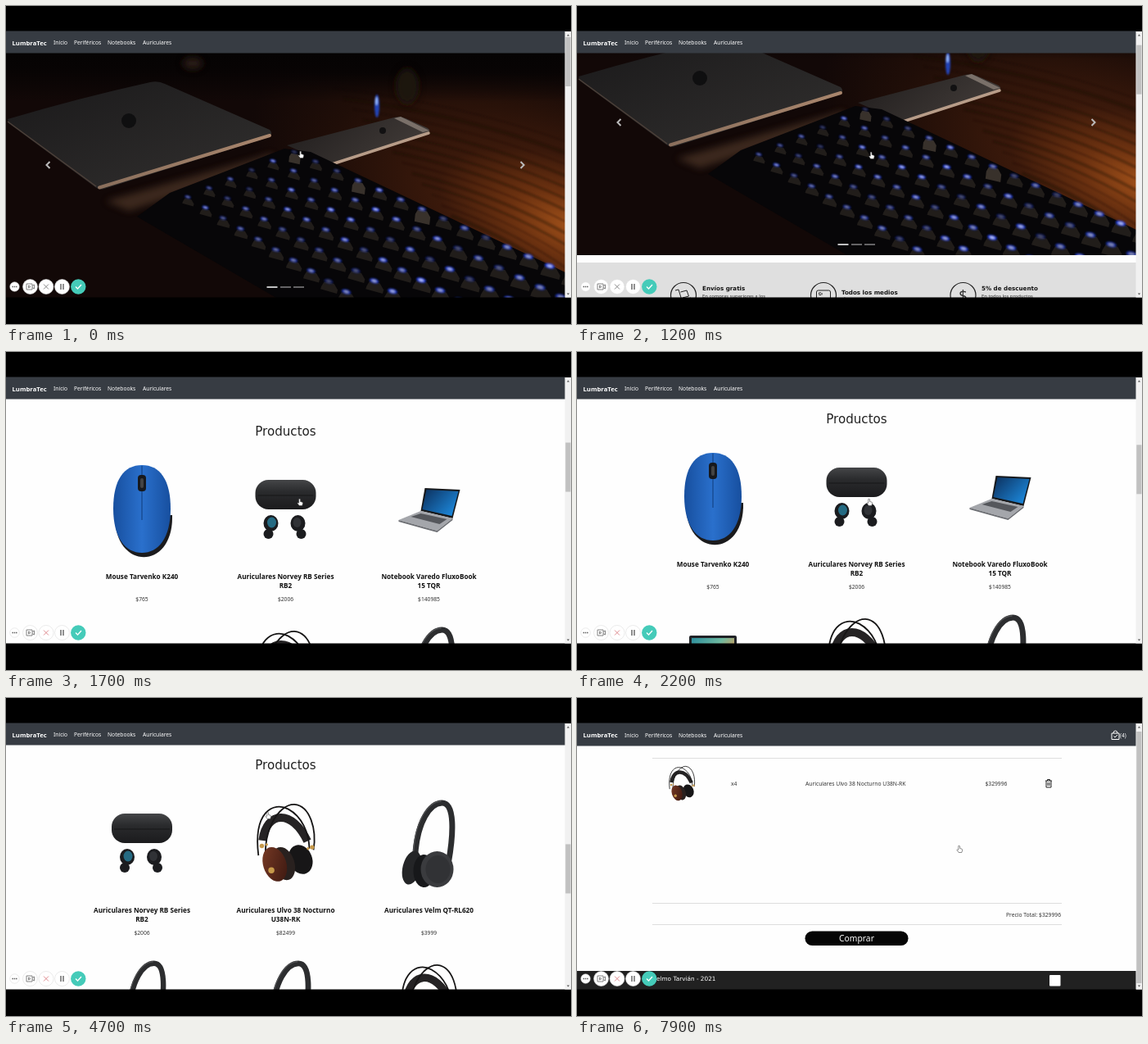
Animation, 690 px wide and 388 px high, one loop 8000 ms. Source, as an HTML page:

```html
<!DOCTYPE html>
<html lang="es">
<head>
<meta charset="utf-8">
<title>Tienda</title>
<style>
html, body { margin: 0; width: 100%; height: 100%; overflow: hidden; background: #000; }
svg { display: block; width: 100%; height: 100%; }
text { font: 6.72px "Noto Sans", "Open Sans", sans-serif; fill: #333; white-space: pre; }
text.nav { font-size: 6.7px; fill: #fff; }
text.brand { font-size: 7.7px; font-weight: 600; fill: #fff; }
text.name { font-size: 8.2px; font-weight: 600; fill: #111; }
text.small { font-size: 5.85px; }
text.head { font: 15.1px "DejaVu Sans", sans-serif; fill: #222; }
text.bold { font: bold 7.15px "DejaVu Sans", sans-serif; fill: #151515; }
text.title { font: bold 9.4px "DejaVu Sans", sans-serif; fill: #151515; }
text.price { font: bold 12.9px "DejaVu Sans", sans-serif; fill: #151515; }
text.foot { font: 7.3px "DejaVu Sans", sans-serif; fill: #fff; }
text.white { fill: #fff; }
text.mid { text-anchor: middle; }
text.end { text-anchor: end; }
</style>
</head>
<body>
<svg viewBox="0 0 690 388">
  <defs>
    <radialGradient id="wood" gradientUnits="userSpaceOnUse" cx="0" cy="0" r="1" gradientTransform="translate(695 272) rotate(22) scale(420 190)">
      <stop offset="0" stop-color="#a3521a"/><stop offset=".2" stop-color="#6b3110"/><stop offset=".42" stop-color="#3a190b"/>
      <stop offset=".75" stop-color="#200e08"/><stop offset="1" stop-color="#120807"/>
    </radialGradient>
    <linearGradient id="wall" x2="0" y2="1">
      <stop offset="0" stop-color="#050303"/><stop offset=".4" stop-color="#080404"/><stop offset="1" stop-color="#080404" stop-opacity="0"/>
    </linearGradient>
    <linearGradient id="lid" y2="1"><stop offset="0" stop-color="#1a191a"/><stop offset="1" stop-color="#32302f"/></linearGradient>
    <linearGradient id="phone" y2=".4"><stop offset="0" stop-color="#1f1c1c"/><stop offset="1" stop-color="#403a37"/></linearGradient>
    <linearGradient id="edge" gradientUnits="userSpaceOnUse" x1="112" x2="323"><stop offset="0" stop-color="#8a6f5c"/><stop offset="1" stop-color="#a9866d"/></linearGradient>
    <linearGradient id="blue"><stop offset="0" stop-color="#174f9f"/><stop offset=".5" stop-color="#2a70cc"/><stop offset="1" stop-color="#174f9f"/></linearGradient>
    <linearGradient id="screen" y2=".7"><stop offset="0" stop-color="#0c2f5c"/><stop offset="1" stop-color="#1c86d8"/></linearGradient>
    <linearGradient id="scene" y2=".5"><stop offset="0" stop-color="#2c8e9c"/><stop offset=".6" stop-color="#6fb9a0"/><stop offset="1" stop-color="#d59a55"/></linearGradient>
    <linearGradient id="walnut" y2="1"><stop offset="0" stop-color="#7a3b26"/><stop offset="1" stop-color="#3a1710"/></linearGradient>
    <linearGradient id="case" x2="0" y2="1"><stop offset="0" stop-color="#454648"/><stop offset=".4" stop-color="#2a2b2d"/><stop offset="1" stop-color="#1b1b1d"/></linearGradient>
    <filter id="soft" x="-50%" y="-50%" width="200%" height="200%"><feGaussianBlur stdDeviation="1"/></filter>
    <filter id="haze" x="-100%" y="-100%" width="300%" height="300%"><feGaussianBlur stdDeviation="4"/></filter>
    <clipPath id="hero"><rect y="57" width="683" height="299"/></clipPath>

    <!-- Products: x is measured from the column centre, y from the row top -->
    <g id="mouse">
      <path d="M-33 62C-33 128 39 128 37 60Z" fill="#1b1b1d"/>
      <path d="M0-1C22-1 35 17 35 52C35 88 20 106 0 106S-35 88-35 52C-35 17-22-1 0-1Z" fill="url(#blue)"/>
      <path d="M0 0V66" stroke="#0f3a78"/>
      <rect x="-5" y="11" width="10" height="20" rx="4" fill="#17191d"/><rect x="-2" y="15" width="4" height="12" rx="2" fill="#444"/>
    </g>
    <g id="buds">
      <rect x="-37" y="17" width="74" height="36" rx="16" fill="url(#case)"/>
      <path d="M-34 36H34" stroke="#111" stroke-width=".7"/>
      <g fill="#1b1c1f">
        <ellipse cx="-18" cy="70" rx="9" ry="10"/><circle cx="-21" cy="83" r="6"/>
        <ellipse cx="15" cy="70" rx="9" ry="10"/><circle cx="19" cy="83" r="6"/>
      </g>
      <ellipse cx="-17" cy="69" rx="5.5" ry="6.5" fill="#256b83"/><ellipse cx="14" cy="69" rx="5" ry="6" fill="#303236"/>
    </g>
    <g id="laptop">
      <path d="M-5 27L38 29L29 64L-10 55Z" fill="#17191c"/>
      <path d="M-3 29L36 31L28 61L-8 53Z" fill="url(#screen)"/>
      <path d="M-10 55L29 64L10 79L-37 66Z" fill="#a4a6ab"/><path d="M-10 58L22 65L13 71L-22 62Z" fill="#55575c"/>
      <path d="M-37 66L10 79L29 64V66L10 81L-37 68Z" fill="#6c6e73"/>
    </g>
    <g id="laptop2">
      <rect x="-29" y="26" width="58" height="37" rx="2" fill="#202226"/><rect x="-26" y="29" width="52" height="31" fill="url(#scene)"/>
      <path d="M-29 63H29L37 78H-37Z" fill="#a9abb0"/><path d="M-24 65H24L27 71H-27Z" fill="#44464b"/>
    </g>
    <g id="wired" fill="none" stroke="#161515">
      <path d="M-34 54C-28 10 10 8 32 55" stroke-width="12" stroke="#252324"/>
      <path d="M-40 76C-48 12-18-4 4 8C24 19 34 42 35 66" stroke-width="2.2"/>
      <path d="M-27 96C-38 42-10 0 13 1C36 3 46 38 41 68" stroke-width="2.2"/>
      <g stroke="none">
        <ellipse cx="22" cy="82" rx="17" ry="22" transform="rotate(-22 22 82)" fill="#171617"/>
        <ellipse cx="-3" cy="88" rx="16" ry="25" transform="rotate(-18 -3 88)" fill="#29211f"/>
        <ellipse cx="-16" cy="89" rx="17" ry="26" transform="rotate(-18 -16 89)" fill="url(#walnut)"/>
        <g fill="#c79a4b"><circle cx="-35" cy="62" r="3.3"/><circle cx="-28" cy="60" r="2"/><circle cx="39" cy="64" r="3.3"/><circle cx="33" cy="66" r="2"/><circle cx="-21" cy="98" r="4.5"/></g>
      </g>
    </g>
    <g id="wireless">
      <path d="M-17 72C-15 26 2 4 16 4C32 4 30 42 24 76" fill="none" stroke="#2c2d2f" stroke-width="7"/>
      <path d="M-19 66C-17 24 0 2 15 2" fill="none" stroke="#505153" stroke-width="1.3"/>
      <ellipse cx="-21" cy="83" rx="11" ry="21" transform="rotate(14 -21 83)" fill="#242527"/>
      <ellipse cx="-6" cy="87" rx="13" ry="20" fill="#17181a"/>
      <ellipse cx="10" cy="85" rx="20" ry="22" fill="#3a3b3e"/><ellipse cx="11" cy="85" rx="15" ry="17" fill="#313235"/>
    </g>
  </defs>

  <rect y="31" width="690" height="325" fill="#fefefe"/>
  <g id="home">
    <g clip-path="url(#hero)">
      <rect y="57" width="683" height="299" fill="url(#wood)"/>
      <g id="grain" fill="none" stroke="#140805" opacity=".35" filter="url(#soft)"></g>
      <rect y="57" width="683" height="60" fill="url(#wall)"/>
      <g filter="url(#haze)">
        <ellipse cx="490" cy="98" rx="14" ry="22" fill="#1d120e"/><ellipse cx="228" cy="70" rx="12" ry="7" fill="#2b1f19"/>
        <path d="M122 238L325 180L330 192L150 250Z" fill="#7a573f" opacity=".4"/>
      </g>
      <path d="M2 138Q90 112 176 93Q186 91 194 95L322 151Q327 156 321 160L120 223Q114 225 109 221L3 143Z" fill="url(#lid)"/>
      <path d="M2 141L110 220" stroke="#4d4039" stroke-width="1.500"/>
      <path d="M114 221.500L322 158" stroke="url(#edge)" stroke-width="4" stroke-linecap="round"/>
      <circle cx="150" cy="140" r="9" fill="#0f0f10"/>
      <g filter="url(#soft)"><ellipse cx="453" cy="122" rx="3" ry="14" fill="#2444b8"/><ellipse cx="452.500" cy="116" rx="1.600" ry="5" fill="#8fb4ff"/></g>
      <path d="M343 170L474 136Q481 134 488 137L515 149Q520 153 514 156L398 194Z" fill="url(#phone)"/>
      <path d="M474 137L482 135L517 152L509 154Z" fill="#7a7069"/>
      <path d="M398 193L516 155" stroke="#b79c88" stroke-width="3.500" stroke-linecap="round"/>
      <circle cx="460" cy="152" r="4" fill="#121112"/>
      <path d="M160 257L200 228L340 174L372 178L683 325V356H330Z" fill="#070608"/>
      <g id="keys"></g>
      <g id="lights" filter="url(#soft)"></g>
    </g>
    <path d="M53.500 190L49.500 194L53.500 198M628.500 190L632.500 194L628.500 198" fill="none" stroke="#bbb" stroke-width="2"/>
    <path d="M318.500 343H331.500" stroke="#fff" stroke-width="1.500"/><path d="M335 343H348M351 343H364" stroke="#fff" stroke-width="1.500" opacity=".5"/>
    <rect y="365" width="683" height="81" fill="#dfdfdf"/>
    <g fill="none" stroke="#222">
      <g stroke-width="1.200"><circle cx="130" cy="405" r="15.500"/><circle cx="301" cy="405" r="15.500"/><circle cx="471.500" cy="405" r="15.500"/></g>
      <path d="M120 399L124 398L128 411L139 408M126.500 401L134 399L136.500 406L129 408"/><circle cx="128" cy="412.500" r="1.600"/>
      <rect x="292.500" y="399" width="17" height="13" rx="2"/><path d="M295.500 402H299V404.500H295.500ZM295 409H307" stroke-dasharray="2.500 1"/>
    </g>
  </g>
  <g id="list"></g>
  <g id="product">
    <use href="#wired" x="217" y="88"/>
    <rect x="348" y="171.500" width="76" height="18" rx="4" fill="#fff" stroke="#333"/>
    <rect x="431.500" y="172" width="139" height="17.500" rx="8.500" fill="#050505"/>
  </g>
  <g id="cart">
    <path d="M92 73.500H592M92 250.500H592M92 276.500H592" stroke="#dedede"/>
    <use href="#wired" transform="translate(128 83) scale(.37)"/>
    <path d="M572 101H580M574.500 101V99.500H577.500V101M573 101V109H579V101M575 103V107M577 103V107" fill="none" stroke="#222"/>
    <rect x="278.500" y="284.500" width="126" height="17.500" rx="8.700" fill="#050505"/>
  </g>
  <g id="footer">
    <rect y="333" width="683" height="23" fill="#212121"/><rect x="577" y="338" width="13.500" height="13.500" rx="1" fill="#fff"/>
  </g>

  <rect width="690" height="31"/><rect y="355.500" width="690" height="33"/>
  <rect id="bar" y="30.500" width="683" height="27" fill="#373c43"/>
  <g id="nav"></g>
  <g id="bag"><path d="M653 43H662V50.500H653ZM655 43Q655 40 657.500 40T660 43M655.500 46.500L657 48L660 45" fill="none" stroke="#fff"/></g>
  <rect x="682.500" y="31" width="7.500" height="324.500" fill="#f1f1f1"/>
  <rect id="thumb" x="683.300" width="6.200" fill="#c1c1c1"/>
  <path d="M684.800 36.500L686.500 34.500L688.200 36.500ZM684.800 350.500L686.500 352.500L688.200 350.500Z" fill="#555"/>

  <g id="recorder" fill="none">
    <g fill="#fff" stroke="#ddd" stroke-width=".6"><circle cx="10.500" cy="342.500" r="5.700"/><circle cx="29.500" cy="342.500" r="9"/><circle cx="49" cy="342.500" r="9"/><circle cx="68.500" cy="342.500" r="9"/></g>
    <circle cx="88.300" cy="342.500" r="9.200" fill="#45cbb9"/>
    <path d="M7.500 342.500H13.500" stroke="#555" stroke-width="1.300" stroke-dasharray="1.400 .9"/>
    <path d="M25 339H32V346H25ZM32 341.500L34.500 340V345L32 343.500M27.500 341L30 342.500L27.500 344Z" stroke="#777" stroke-width=".9"/>
    <path id="cancel" d="M46 339.500L52 345.500M52 339.500L46 345.500"/>
    <path d="M67 339V346M70 339V346" stroke="#555" stroke-width="1.300"/>
    <path d="M85 342.500L87.500 345L92 340" stroke="#fff" stroke-width="1.300"/>
  </g>
  <path id="cursor" d="M-1.200-3.500Q0-4.500 .6-3V-.5L3 .2Q4 .6 3.600 2L2.800 4.500H-.8L-3 1.500Q-3 .5-1.200 1.200Z" fill="#fff" stroke="#444" stroke-width=".6"/>
</svg>
<script>
const $ = id => document.getElementById(id);
const add = (id, markup) => $(id).insertAdjacentHTML('beforeend', markup);
const text = (x, y, content, style = '') => `<text x="${x}" y="${y}" class="${style}">${content}</text>`;
const COLUMNS = [166, 341.5, 516.5];

const goods = {
  mouse: ['mouse', 1, ['Mouse Tarvenko K240'], '$765'],
  buds: ['buds', 1, ['Auriculares Norvey RB Series', 'RB2'], '$2006'],
  laptop: ['laptop', 1, ['Notebook Varedo FluxoBook', '15 TQR'], '$140985'],
  laptop2: ['laptop2', 1, ['Notebook Varedo Lumen 14'], '$98750'],
  wired: ['wired', .83, ['Auriculares Ulvo 38 Nocturno', 'U38N-RK'], '$82499'],
  wireless: ['wireless', 1, ['Auriculares Velm QT-RL620'], '$3999'],
  studio: ['wireless', .92, ['Auriculares Norvey Duplo'], '$5499'],
  compact: ['wireless', .97, ['Auriculares Velm QT-RL310'], '$4599'],
  light: ['wired', .8, ['Auriculares Ulvo 12'], '$61999']
};

function row(page, top, names) {
  names.forEach((name, column) => {
    const [shape, scale, lines, price] = goods[name], x = COLUMNS[column];
    add(page, `<use href="#${shape}" transform="translate(${x} ${top + (shape === 'wired' ? 5 : 0)}) scale(${scale})"/>`
      + lines.map((line, i) => text(x, top + 138 + i * 11, line, 'name mid')).join('')
      + text(x, top + 164.5, price, 'mid'));
  });
}

// Keys run down to the right in rows that draw closer towards the front edge.
function keyboard() {
  const noise = n => Math.abs(Math.sin(n * 12.9898) * 43758.5453) % 1;
  for (let j = 0; j < 6; j++) for (let i = 0; i < 18; i++) {
    const x = 352 + i * (26 - j * .9) - j * 26, y = 178 + i * (11.6 + j * .25) + j * 11;
    const size = .75 + i * .045, glow = .35 + noise(i * 7 + j) * .65;
    const tall = j === 0 && i % 3 === 0 && i < 9;
    add('keys', `<path transform="translate(${x} ${y + 4}) scale(${size})" d="M-8 2L-5-3L6-1L10 6L9 ${tall ? 15 : 10}L-9 ${tall ? 11 : 5}Z" fill="${tall ? '#38312b' : '#211d1a'}"/>`);
    add('lights', `<g transform="translate(${x} ${y}) rotate(15) scale(${size})" opacity="${glow}"><ellipse rx="5" ry="2.500" fill="#2443e0"/><ellipse rx="2.600" ry="1.200" fill="#b9c6ff"/></g>`);
  }
  for (let k = 0; k < 14; k++)
    add('grain', `<path d="M${400 + k * 12} ${100 + k * 13}Q${550 + k * 6} ${118 + k * 14} 683 ${165 + k * 14}" stroke-width="${1 + noise(k) * 4}"/>`);
}

keyboard();
add('home', text(153, 399, 'Envíos gratis', 'bold') + text(153, 408, 'En compras superiores a los', 'small') + text(153, 416.5, '$4.000', 'small')
  + text(323, 404, 'Todos los medios', 'bold') + text(323, 412.5, 'de pago', 'bold')
  + text(494, 399, '5% de descuento', 'bold') + text(494, 408, 'En todos los productos', 'small') + text(494, 416.5, 'comprando en nuestro local', 'small')
  + `<text x="471.500" y="411.500" class="mid" style="font-size:18px">$</text>` + text(341.5, 492, 'Productos', 'head mid'));
row('home', 529, ['mouse', 'buds', 'laptop']);
row('home', 725, ['laptop2', 'wired', 'wireless']);
row('home', 921, ['studio', 'compact', 'light']);

add('list', text(341.5, 87, 'Productos', 'head mid'));
row('list', 124, ['buds', 'wired', 'wireless']);
row('list', 320, ['studio', 'compact', 'light']);

add('product', text(348, 106.3, 'Auriculares Ulvo 38 Nocturno U38N-', 'title') + text(348, 117.3, 'RK', 'title')
  + text(348, 137.5, '$82499', 'price') + text(355, 157.5, 'Stock: 16')
  + text(366.5, 183, '-', 'mid') + '<text id="amount" x="386" y="183" class="mid"></text>' + text(406, 183, '+', 'mid')
  + text(501, 183, 'Agregar al carrito', 'white mid')
  + ['Lorem ipsum dolor sit amet consectetur adipisicing elit. Aspernatur, nobis quo vero sint saepe magnam inventore cumque laboriosam',
    'adipisci hic expedita, eligendi minima sunt enim, ex vel nesciunt quis qui? Earum eos maiores libero, nemo perferendis atque dicta labore',
    'quaerat, sint quam perspiciatis hic itaque, iusto consequatur saepe corporis optio enim beatae cumque praesentium vitae? Facilis non',
    'animi voluptates sit.'].map((line, i) => text(123, 226 + i * 10.7, line)).join(''));
add('cart', text(188, 106.5, 'x4') + text(279, 106.5, 'Auriculares Ulvo 38 Nocturno U38N-RK') + text(498.5, 106.5, '$329996')
  + text(591, 267, 'Precio Total: $329996', 'end') + '<text x="341.500" y="297" class="white mid" style="font-size:10.300px">Comprar</text>');
add('footer', text(97, 345, 'elmo Tarvián - 2021', 'foot'));
add('nav', text(7.5, 47.5, 'LumbraTec', 'brand') + text(58, 47, 'Inicio', 'nav') + text(83, 47, 'Periféricos', 'nav')
  + text(124, 47, 'Notebooks', 'nav') + text(167, 47, 'Auriculares', 'nav'));
add('bag', text(663, 48, '(4)', 'nav'));

const SCROLL = [[0, 0], [1000, 0], [1100, 15], [1200, 52], [1300, 135], [1400, 225], [1500, 300], [1700, 390], [1800, 405],
  [2300, 405], [2400, 440], [2600, 600], [2800, 720], [3000, 755]];
const POINTER = [[0, 360, 181], [1000, 359, 181], [1400, 360, 183], [2200, 357, 183], [2800, 357, 183], [3200, 185, 46],
  [3400, 185, 46], [3700, 320, 143], [5300, 320, 143], [5800, 410, 187], [6600, 410, 187], [6900, 467, 184]];

function at(track, t) {
  const next = track.findIndex(key => key[0] > t);
  if (next < 0) return track.at(-1).slice(1);
  const [a, b] = [track[next - 1], track[next]], k = (t - a[0]) / (b[0] - a[0]);
  return a.slice(1).map((value, i) => value + (b[i + 1] - value) * k);
}
const show = (id, visible) => $(id).setAttribute('display', visible ? 'inline' : 'none');

function draw(now) {
  const t = Math.floor(now % 8000 / 100) * 100;
  const [scroll] = at(SCROLL, t);
  const page = t < 3400 ? 'home' : t < 5000 ? 'list' : t < 7900 ? 'product' : 'cart';
  for (const id of ['home', 'list', 'product', 'cart']) show(id, id === page);
  show('footer', t >= 5000);
  show('bag', t >= 7000);
  $('home').setAttribute('transform', `translate(0 ${-scroll})`);
  $('bar').setAttribute('height', t < 7000 ? 27 : 28);
  $('nav').setAttribute('transform', `translate(0 ${t < 7000 ? 0 : .6})`);
  $('cancel').setAttribute('stroke', t < 1300 ? '#888' : '#df8b90');
  const [top, height] = { product: [58, 290], cart: [41, 307] }[page] || [38 + scroll * .186, 60];
  $('thumb').setAttribute('y', top);
  $('thumb').setAttribute('height', height);
  $('amount').textContent = 1 + [5900, 6300, 6500].filter(click => t >= click).length;
  $('cursor').setAttribute('transform', `translate(${at(POINTER, t)})`);
  requestAnimationFrame(draw);
}
requestAnimationFrame(draw);
</script>
</body>
</html>
```
